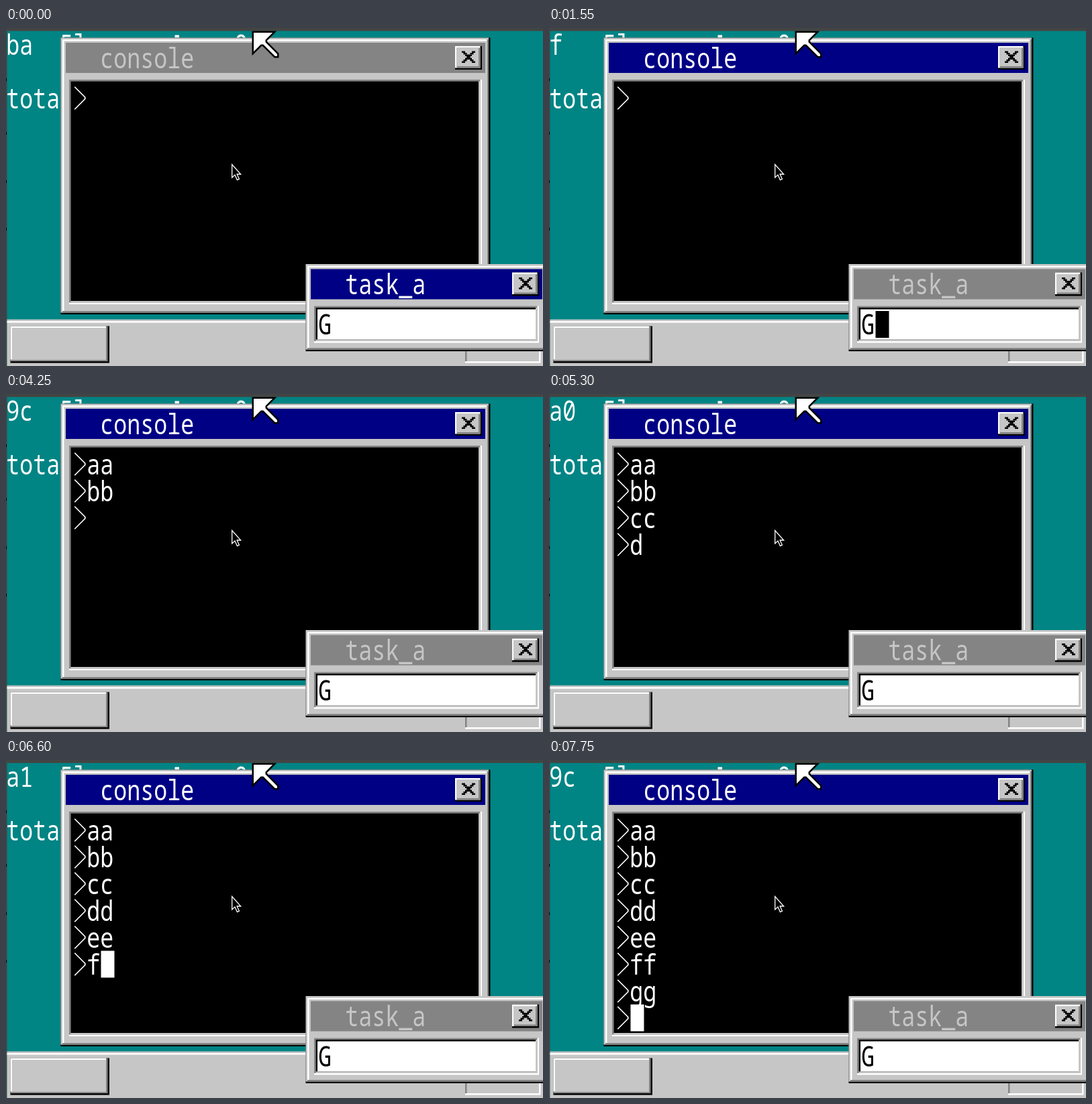
These frames come from a looping animation (800x504 px, 8000 ms). An HTML page:

```html
<!DOCTYPE html>
<html lang="en">
<head>
<meta charset="utf-8">
<title>Console</title>
<style>
html, body { margin: 0; width: 100%; height: 100%; overflow: hidden; background: #444; }
svg { display: block; }
text { font: 300 13.333px "Noto Sans Mono", "Liberation Mono", monospace; white-space: pre; }
</style>
</head>
<body>
<svg id="stage" width="800" height="504" viewBox="0 0 800 504"></svg>
<script>
const LOOP = 8000;
const TAB_TIME = 1550;
const GREY = '#c6c6c6', DARK = '#848484', WHITE = '#fff', BLACK = '#000', NAVY = '#000084', TEAL = '#008484';

// Screen units: 320 x 200 pixels, each 2.5 stage pixels wide; a character cell is 8 x 16.
const rect = (x, y, w, h, fill, id = '') =>
  `<rect ${id && `id="${id}"`} x="${x}" y="${y}" width="${w}" height="${h}" fill="${fill}"/>`;

const label = (x, y, str, fill = WHITE, id = '') =>
  `<text ${id && `id="${id}"`} transform="translate(${x - 0.5} ${y + 14}) scale(1 1.26)" fill="${fill}">${str}</text>`;

function closeButton(x, y) {
  let s = rect(x, y, 16, 14, BLACK) + rect(x, y, 15, 13, WHITE) +
    rect(x + 1, y + 1, 14, 12, DARK) + rect(x + 1, y + 1, 13, 11, GREY);
  for (let i = 0; i < 7; i++) {
    s += rect(x + 4 + i, y + 3 + i, 2, 1, BLACK) + rect(x + 10 - i, y + 3 + i, 2, 1, BLACK);
  }
  return s;
}

function textBox(x, y, w, h, fill) {
  return rect(x - 3, y - 3, w + 6, h + 6, WHITE) + rect(x - 3, y - 3, w + 5, h + 5, DARK) +
    rect(x - 2, y - 2, w + 4, h + 4, GREY) + rect(x - 2, y - 2, w + 3, h + 3, BLACK) +
    rect(x - 1, y - 1, w + 2, h + 2, fill);
}

function windowBox(name, x, y, w, h, title, content) {
  return `<g transform="translate(${x} ${y})">` +
    rect(0, 0, w, h, BLACK) + rect(0, 0, w - 1, h - 1, GREY) +
    rect(1, 1, w - 2, h - 2, DARK) + rect(1, 1, w - 3, h - 3, WHITE) +
    rect(2, 2, w - 4, h - 4, GREY) +
    rect(3, 3, w - 6, 18, DARK, name + 'Bar') +
    label(24, 4, title, GREY, name + 'Title') +
    closeButton(w - 21, 5) + content + '</g>';
}

function taskbar() {
  return rect(0, 172, 320, 28, GREY) + rect(0, 173, 320, 1, WHITE) +
    rect(2, 176, 59, 22, BLACK) + rect(2, 176, 58, 21, DARK) +
    rect(2, 176, 57, 20, WHITE) + rect(3, 177, 56, 19, GREY) +
    rect(273, 176, 45, 22, WHITE) + rect(273, 176, 44, 21, DARK) +
    rect(274, 177, 43, 20, GREY);
}

const ROWS = 8;
let lines = '';
for (let i = 0; i < ROWS; i++) {
  const y = 28 + i * 16;
  lines += `<path id="prompt${i}" d="M8.3 ${y + 1.3}l6.2 6.2v1l-6.2 6.2" fill="none" stroke="#fff" stroke-width=".7"/>` +
    label(16, y, '', WHITE, 'line' + i);
}

const stage = document.getElementById('stage');
stage.innerHTML =
  rect(0, 0, 800, 504, '#444') +
  '<g transform="translate(1.5 4.5) scale(2.5)">' +
  rect(0, 0, 320, 200, TEAL) +
  label(0, 0, '', WHITE, 'code') +
  label(32, 0, '5l') + rect(100, 2.4, 2.6, 1.6, WHITE) + label(136, 0, '0') +
  label(0, 32, 'total') +
  taskbar() +
  windowBox('con', 32, 4, 256, 165, 'console',
    textBox(8, 28, 240, 128, BLACK) + lines + rect(0, 0, 8, 16, WHITE, 'conCursor')) +
  windowBox('task', 178, 139, 144, 52, 'task_a',
    textBox(8, 28, 128, 16, WHITE) + label(8, 28, 'G', BLACK) + rect(16, 28, 8, 16, BLACK, 'taskCursor')) +
  '<path transform="translate(146 0)" d="M.5 .5h13l-5 5v1l7 7v2h-2l-7-7h-1l-5 5z" fill="#fff" stroke="#000"/>' +
  '</g>' +
  [75, 155, 227, 298].map(y => rect(0, y, 1, 4, BLACK)).join('') +
  '<path d="M336.7 203.5v19.5l4.3-4 3.4 7.6 3-1.4-3.3-7.2h5.6z" fill="#000" stroke="#fff" stroke-width="1.3"/>';

const $ = id => document.getElementById(id);

// Keyboard scan codes by time: press, then release (press + 0x80).
const events = (
  '0 ba,1550 f,1600 8f,2950 1e,3000 9e,3150 1e,3250 9e,3600 1c,3750 9c,' +
  '3800 30,3850 b0,3950 30,4050 b0,4150 1c,4250 9c,' +
  '4600 2e,4650 ae,4700 2e,4850 ae,5050 1c,5100 9c,' +
  '5250 20,5300 a0,5400 20,5500 a0,5600 1c,5700 9c,' +
  '5850 12,5900 92,6000 12,6100 92,6250 1c,6300 9c,' +
  '6550 21,6600 a1,6700 21,6750 a1,6900 1c,7000 9c,' +
  '7300 22,7350 a2,7450 22,7550 a2,7650 1c,7750 9c'
).split(',').map(e => e.split(' '));
const keys = { '1e': 'a', '30': 'b', '2e': 'c', '20': 'd', '12': 'e', '21': 'f', '22': 'g', '1c': '\n' };

const conBlink = [2450, 2950, 3500, 3950, 4450, 5050, 5450, 5950, 6500, 6950, 7500];
const taskBlink = [400, 950, 1400, 2950];
const isOn = (toggles, t) => toggles.filter(x => x <= t).length % 2 === 1;

function setActive(name, active) {
  $(name + 'Bar').setAttribute('fill', active ? NAVY : DARK);
  $(name + 'Title').setAttribute('fill', active ? WHITE : GREY);
}

function show(id, visible) {
  $(id).setAttribute('visibility', visible ? 'visible' : 'hidden');
}

function render(t) {
  const past = events.filter(e => +e[0] <= t).map(e => e[1]);
  const typed = past.map(c => keys[c] || '').join('').split('\n');
  const row = typed.length - 1;

  $('code').textContent = past[past.length - 1];
  for (let i = 0; i < ROWS; i++) {
    show('prompt' + i, i <= row);
    $('line' + i).textContent = typed[i] || '';
  }
  setActive('con', t >= TAB_TIME);
  setActive('task', t < TAB_TIME);

  $('conCursor').setAttribute('x', 16 + typed[row].length * 8);
  $('conCursor').setAttribute('y', 28 + row * 16);
  show('conCursor', isOn(conBlink, t));
  show('taskCursor', isOn(taskBlink, t));
}

const start = performance.now();
function tick() {
  render((performance.now() - start) % LOOP);
  requestAnimationFrame(tick);
}
render(0);
requestAnimationFrame(tick);
</script>
</body>
</html>
```
